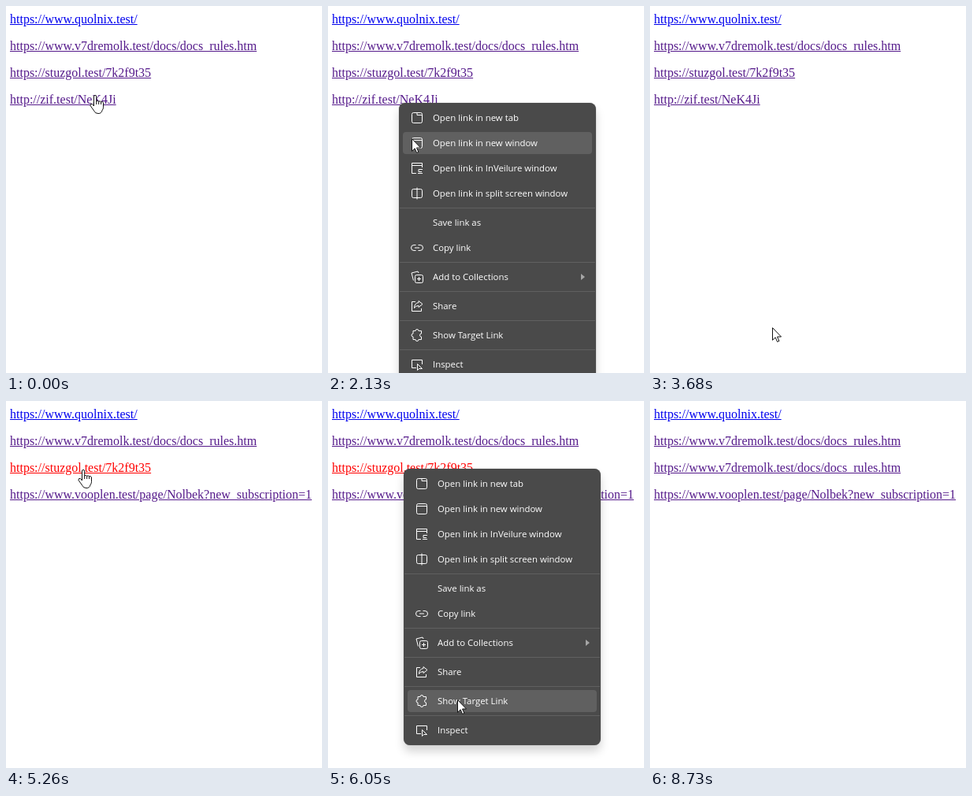
Write an HTML page that moves like this. It is 401 px wide and 466 px high and loops after 9.94 s.

```html
<!DOCTYPE html>
<html lang="en">
<head>
<meta charset="utf-8">
<title>Link menu</title>
<style>
  html, body { margin: 0; width: 100%; height: 100%; overflow: hidden; background: #fff; }
  #stage { position: relative; width: 401px; height: 466px; overflow: hidden; }
  .link {
    position: absolute; left: 5px; color: #551a8b; white-space: nowrap;
    font: 16px/17px "Liberation Serif", "Times New Roman", serif; text-decoration: underline;
  }
  .link.fresh { color: #00e; }
  .link.active { color: #f00; }
  #menu {
    position: absolute; display: none; width: 250px; height: 351px;
    border-radius: 8px; background: #4a4a4a;
    box-shadow: 0 0 1px rgba(0,0,0,.5), 0 8px 12px rgba(0,0,0,.17);
    color: #fff; font: 11.4px/28px "Open Sans", "Noto Sans", sans-serif;
  }
  .row {
    position: absolute; left: 5px; width: 202px; height: 28px; padding-left: 38px;
    border-radius: 4px; white-space: nowrap;
  }
  .row.hot { background: #606060; }
  .row svg { position: absolute; left: 10px; top: 6px; fill: none; stroke: #fff; }
  .row i {
    position: absolute; left: 226px; top: 10px; border: solid transparent;
    border-width: 4px 0 4px 5px; border-left-color: #a6a6a6;
  }
  .rule { position: absolute; left: 1px; right: 1px; height: 1px; background: #606060; }
  .cursor {
    position: absolute; display: none; overflow: visible;
    fill: #fff; stroke: #111; stroke-linejoin: round;
  }
</style>
</head>
<body>
<div id="stage">
  <div id="menu"></div>
  <svg class="cursor" id="arrow" width="12" height="19">
    <path d="M.5.6v15.7l3.6-3.5 2.5 5.6 2.3-1-2.4-5.4h5z"/>
  </svg>
  <svg class="cursor" id="hand" width="18" height="24">
    <path d="M5.5 14V2a1.6 1.6 0 0 1 3.2 0v6q1.5-1.5 3 .3 1.5-1.3 2.9.5 1.5-1 2.9.9v6q0 2-1.5 4-1 4-5 3.8-4 0-5-3l-5-7q0-3 2.5-2z"/>
    <path fill="none" d="M8.7 8v4m3-3.7V12m2.9-3.2V12"/>
  </svg>
</div>
<script>
(() => {
  const LOOP = 9940, STEP = 120;
  const LINK_TOP = 8, LINK_GAP = 34, ROW = 32, GAP = 5;

  const byId = id => document.getElementById(id);
  const [stage, menu, arrow, hand] = ['stage', 'menu', 'arrow', 'hand'].map(byId);
  const within = (v, a, b) => v >= a && v < b;

  // Links
  const DOCS = 'https://www.v7dremolk.test/docs/docs_rules.htm';
  const SHORT_A = 'https://stuzgol.test/7k2f9t35';
  const SHORT_B = 'http://zif.test/NeK4Ji';
  const LONG_B = 'https://www.vooplen.test/page/Nolbek?new_subscription=1';

  const links = ['https://www.quolnix.test/', DOCS, SHORT_A, SHORT_B].map((text, i) => {
    const el = document.createElement('span');
    el.className = i ? 'link' : 'link fresh';
    el.style.top = LINK_TOP + LINK_GAP * i + 'px';
    el.textContent = text;
    stage.insertBefore(el, menu);
    return el;
  });

  // Menu
  const box = (x, y, w, h) => `<rect x="${x}" y="${y}" width="${w}" height="${h}" rx="2"/>`;
  const line = d => `<path d="${d}"/>`;
  const pane = box(1.5, 1.5, 13, 13);

  const items = [
    ['Open link in new tab', pane + line('M8 2v2.5h6')],
    ['Open link in new window', pane + line('M2 4.5h12')],
    ['Open link in InVeilure window', line('M7 14.5H1.5v-13h13V7M2 4.5h12m1 5h-5v3h4m-5 2h6')],
    ['Open link in split screen window', box(1.5, 2.5, 13, 11) + line('M8 .5v15')],
    null,
    ['Save link as'],
    ['Copy link', line('M6.5 4.5H4a3.5 3.5 0 0 0 0 7h2.5m3-7H12a3.5 3.5 0 0 1 0 7H9.5M5 8h6')],
    null,
    ['Add to Collections', box(5.5, 5.5, 10, 10) + line('M10.5 8v5M8 10.5h5m-9.5 2L1 3l8-2 1 2'), '<i></i>'],
    null,
    ['Share', line('M6 2.5H1.5v12h12V11M10 1.5l5 4-5 4v-2q-4 0-5.5 3 0-6 5.5-7z')],
    null,
    ['Show Target Link', line('M3 2.5h3a2 2 0 0 1 4 0h3.5V6a2 2 0 0 0 0 4v3.5H10a2 2 0 0 1-4 0H3V10a2 2 0 0 1 0-4z')],
    null,
    ['Inspect', line('M7 12.5H1.5v-10h13V8m-6-.5v8l2-2h4z')]
  ];

  const rows = [];
  let offset = 3;
  for (const item of items) {
    const el = document.createElement('div');
    el.className = item ? 'row' : 'rule';
    el.style.top = offset + 2 + 'px';
    if (item) {
      const [label, icon = '', extra = ''] = item;
      el.innerHTML = `${label}<svg width="16" height="16">${icon}</svg>${extra}`;
      rows.push({ el, offset });
    }
    menu.append(el);
    offset += item ? ROW : GAP;
  }

  // Each glide: start time, steps, end x, end y
  const GLIDES = [
    [0, 1, 112, 113], [280, 4, 107, 117], [1040, 5, 90, 124],
    [2130, 5, 168, 346], [2730, 4, 155, 408], [3800, 2, 128, 177],
    [4070, 5, 100, 100], [4700, 1, 97, 87], [5530, 2, 165, 374],
    [5800, 1, 164, 379], [6320, 2, 160, 374], [6970, 2, 160, 368],
    [7620, 8, 302, 445], [8610, 1, 308, 447]
  ];
  const POINTER_END = 8730;

  const VISITS = [
    { link: links[3], press: 1890, release: 2130, open: 2010, close: 3680, left: 90, top: 123 },
    { link: links[2], press: 5260, release: 6170, open: 5380, close: 6170, left: 96, top: 86 }
  ];

  function pointerAt(t) {
    let x = 0, y = 0;
    for (const [start, steps, endX, endY] of GLIDES) {
      if (t < start) break;
      const k = Math.min(1, (Math.floor((t - start) / STEP) + 1) / steps);
      x += (endX - x) * k;
      y += (endY - y) * k;
    }
    return [Math.round(x), Math.round(y)];
  }

  function place(el, x, y) {
    el.style.left = x + 'px';
    el.style.top = y + 'px';
  }

  function show(el, on) {
    el.style.display = on ? 'block' : 'none';
  }

  function setText(el, text) {
    if (el.textContent !== text) el.textContent = text;
  }

  function draw(t) {
    const [x, y] = pointerAt(t);

    setText(links[2], t < 6170 ? SHORT_A : DOCS);
    setText(links[3], t < 4070 ? SHORT_B : LONG_B);
    for (const v of VISITS) v.link.classList.toggle('active', within(t, v.press, v.release));

    const visit = VISITS.find(v => within(t, v.open, v.close));
    show(menu, visit);
    if (visit) {
      place(menu, visit.left, visit.top);
      for (const row of rows) {
        row.el.classList.toggle('hot', within(y - visit.top - row.offset, 0, ROW));
      }
    }

    const overLink = !visit && links.some((el, i) =>
      within(y - LINK_TOP - LINK_GAP * i, 0, 18) && within(x - 5, 0, el.offsetWidth));
    const visible = t < POINTER_END;
    show(hand, visible && overLink);
    show(arrow, visible && !overLink);
    place(hand, x - 6, y);
    place(arrow, x, y);
  }

  const began = performance.now();
  function tick() {
    draw((performance.now() - began) % LOOP);
    requestAnimationFrame(tick);
  }
  tick();
})();
</script>
</body>
</html>
```
